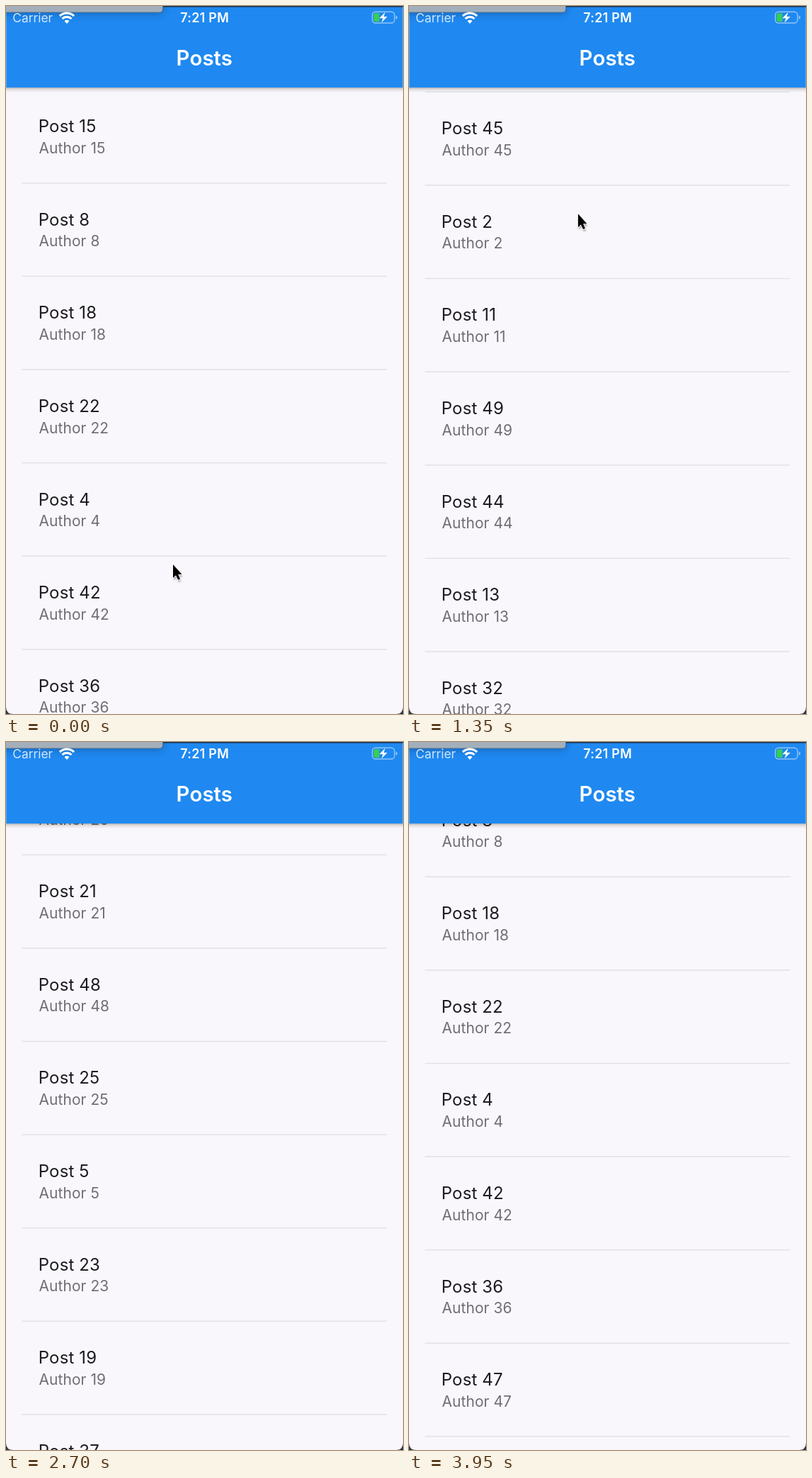
An HTML page for the animation above (4 s loop, 561 px wide and 999 px high).

```html
<!DOCTYPE html>
<html lang="en">
<head>
<meta charset="utf-8">
<title>Posts</title>
<style>
  html, body { margin: 0; width: 100%; height: 100%; overflow: hidden; background: #f9f7fb; }
  svg { display: block; width: 561px; height: 999px; font-family: Inter, Roboto, sans-serif; }
  .title { font-size: 24px; letter-spacing: 0.12px; fill: #1c1b1f; }
  .author { font-size: 21px; letter-spacing: 0.05px; fill: #706e73; }
</style>
</head>
<body>
<svg viewBox="0 0 561 999">
  <defs>
    <linearGradient id="fade" x1="0" y1="0" x2="0" y2="1">
      <stop offset="0" stop-color="#000" stop-opacity=".28"/>
      <stop offset=".4" stop-color="#000" stop-opacity=".1"/>
      <stop offset="1" stop-color="#000" stop-opacity="0"/>
    </linearGradient>
    <filter id="blur" x="-20%" y="-200%" width="140%" height="600%"><feGaussianBlur stdDeviation="6"/></filter>
    <filter id="soft" x="-60%" y="-40%" width="220%" height="200%"><feGaussianBlur stdDeviation="1.6"/></filter>
    <clipPath id="bar"><rect width="561" height="115"/></clipPath>
    <path id="arrow" d="M1 1V20L5 16.2L8.2 22.8L11.1 21.5L8.2 15H13.6Z"/>
  </defs>
  <rect width="561" height="999" fill="#f9f7fb"/>
  <g id="list"></g>

  <rect y="115" width="561" height="7" fill="url(#fade)"/>
  <g clip-path="url(#bar)">
    <rect width="561" height="115" fill="#1f89f1"/>
    <path d="M.5 0V115M560.5 0V115" stroke="#fff" stroke-opacity=".25"/>
    <rect x="-20" y="-10" width="243" height="21" rx="6" fill="#00234d" opacity=".35" filter="url(#blur)"/>
    <rect width="561" height="1.5" fill="#23303f"/>
    <path d="M0 0H221.5V4Q221.5 9 216.5 9H0Z" fill="#a5afba"/>
    <path d="M221.5 0V4Q221.5 9 216.5 9H0" fill="none" stroke="#56708c"/>
  </g>

  <g fill="#fff">
    <text x="9.2" y="23" font-size="17.4" fill-opacity=".8">Carrier</text>
    <text x="280.6" y="23" font-size="18" font-weight="600" letter-spacing=".25" text-anchor="middle">7:21 PM</text>
    <text x="280.3" y="84" font-size="29.5" font-weight="600" text-anchor="middle">Posts</text>
    <path d="M86 25L82.6 21.2A4.8 4.8 0 0 1 89.4 21.2Z"/>
    <path d="M79.5 18A9.4 9.4 0 0 1 92.5 18M75.9 14.2A14.4 14.4 0 0 1 96.1 14.2" fill="none" stroke="#fff" stroke-width="3.1"/>
  </g>
  <rect x="517.6" y="8.2" width="31.4" height="15.8" rx="4.5" fill="none" stroke="#fff" stroke-opacity=".5" stroke-width="1.4"/>
  <path d="M550.8 13.2Q553.2 14 553.2 16.1T550.8 19Z" fill="#fff" fill-opacity=".5"/>
  <path d="M522.2 10.2H527.5V22H522.2Q519.6 22 519.6 19.4V12.8Q519.6 10.2 522.2 10.2Z" fill="#35cf55"/>
  <path d="M535.8 8.8L527.6 17.2H532.6L530.6 23.6L538.8 15H533.8Z" fill="#fff"/>

  <path d="M0 989V999H10Q0 999 0 989ZM561 989V999H551Q561 999 561 989Z" fill="#29333d"/>

  <g id="cursor">
    <use href="#arrow" x="1" y="3" opacity=".4" filter="url(#soft)"/>
    <use href="#arrow" fill="#000" stroke="#fff" stroke-width="1.8" paint-order="stroke"/>
  </g>
</svg>
<script>
const LOOP = 4000, STEP = 50, COUNT = 50, PITCH = 131.6;
const REST = 5692;   // scroll offset at the end of the list
const HIT = 1636;    // moment the first fling reaches that end
const list = document.getElementById("list");
const cursor = document.getElementById("cursor");

// Posts that can be read while scrolling; the rest fill the gaps between runs
const opening = [15, 8, 18, 22, 4, 42, 36, 47];
const middle = [41, 28, 27, 43, 16, 34, 6, 14, 24, 33, 40, 7];
const later = [20, 21, 48, 25, 5, 23, 19, 37];
const ending = [30, 17, 9, 35, 26, 46, 3];

function postOrder() {
  const known = new Set([...opening, ...middle, ...later, ...ending]);
  const spare = Array.from({ length: COUNT }, (_, i) => i * 19 % COUNT + 1)
    .filter(id => !known.has(id));
  return [
    ...opening, ...spare.splice(0, 3),
    ...middle, ...spare.splice(0, 1),
    ...later, ...spare, ...ending
  ];
}

function row(id, i) {
  const y = i * PITCH;
  const rule = i < COUNT - 1
    ? `<rect x="22.5" y="${y + 249.1}" width="516" height="1.5" fill="#e3e1e5"/>` : "";
  return `<text class="title" x="45.8" y="${y + 178.2}">Post ${id}</text>` +
    `<text class="author" x="46.5" y="${y + 207.8}">Author ${id}</text>${rule}`;
}

list.innerHTML = postOrder().map(row).join("");

// Friction fling: at offset pos at time t0, with dist still to travel
const fling = (t, t0, pos, dist) => pos + dist * (1 - Math.exp(-0.00199 * (t - t0)));

// Overscroll at the end: critically damped spring
const bounce = dt => 2.36 * dt * Math.exp(-0.01414 * dt);

function scrollAt(t) {
  if (t < HIT) return Math.min(REST, Math.max(0, fling(t, 950, 2067, 4860)));
  if (t < 2400) return REST + bounce(t - HIT);
  return Math.min(REST, fling(t, 2700, 3249, -3335));
}

function ramp(t, from, to) {
  const u = Math.min(1, Math.max(0, (t - from) / (to - from)));
  return u * u * (3 - 2 * u);
}

// Drift, flick up, leave at the top, return, drag down and out, peek in again
function pointerAt(t) {
  const back = ramp(t, 1850, 2200);
  const peek = Math.exp(-(((t - 3100) / 60) ** 2));
  const x = 235 + 4 * ramp(t, 100, 450) - 3 * ramp(t, 1100, 1700) - 17 * back - 6 * ramp(t, 2550, 3000);
  const y = 787 - 12 * ramp(t, 100, 450) - 300 * ramp(t, 750, 850) - 486 * ramp(t, 1100, 1700) +
    386 * back + 635 * ramp(t, 2350, 2550) - 62 * peek;
  return [x, y];
}

function draw(t) {
  const [x, y] = pointerAt(t);
  list.setAttribute("transform", `translate(0 ${-scrollAt(t).toFixed(2)})`);
  cursor.setAttribute("transform", `translate(${x.toFixed(1)} ${y.toFixed(1)})`);
}

const start = performance.now();
function tick() {
  const t = (performance.now() - start) % LOOP;
  draw(Math.floor(t / STEP) * STEP);
  requestAnimationFrame(tick);
}
tick();
</script>
</body>
</html>
```
